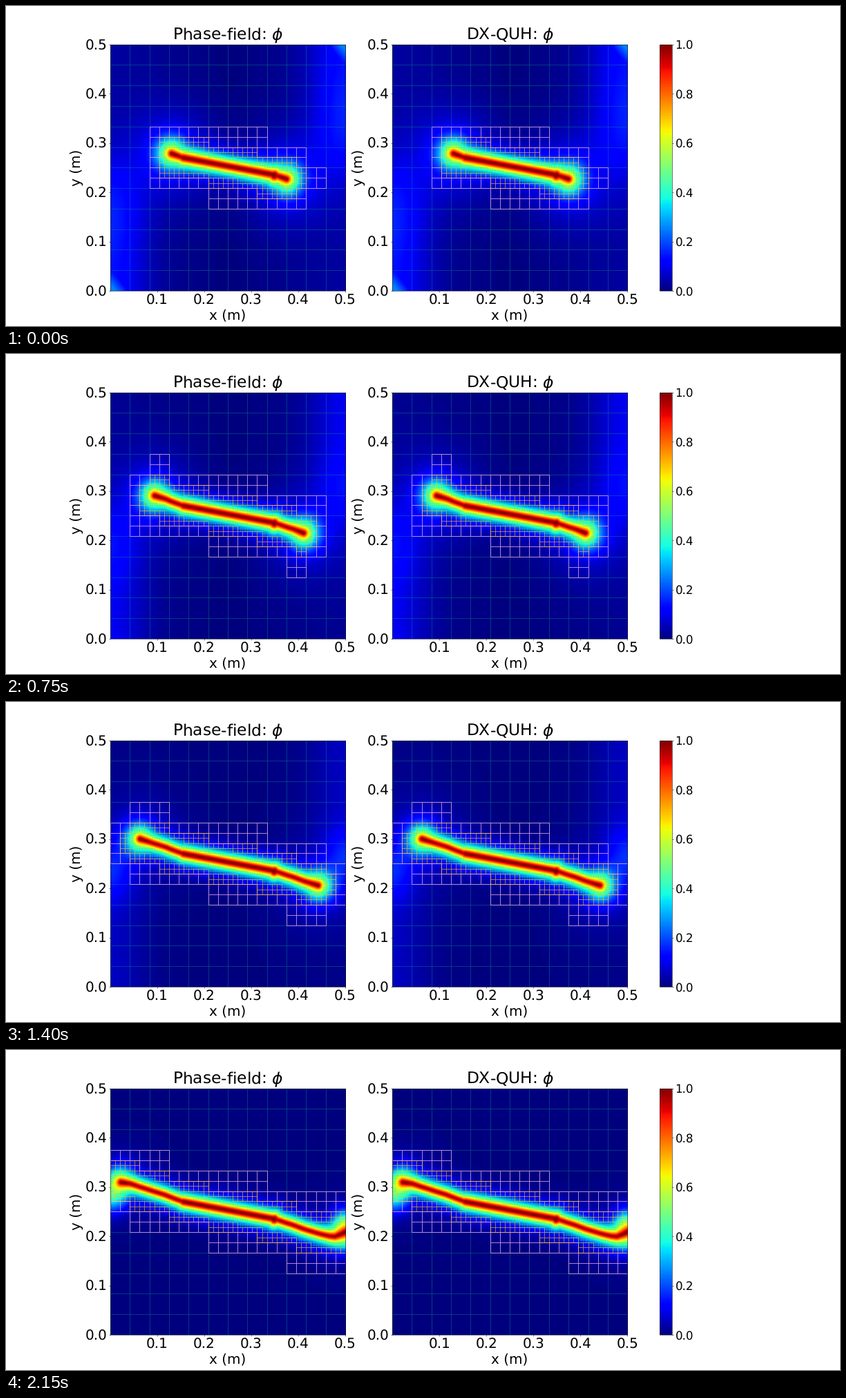
These frames come from a looping animation (1207x464 px, 2.2 s). A matplotlib script:

```python
import numpy as np
import matplotlib.pyplot as plt
from matplotlib.animation import FuncAnimation
from matplotlib.collections import LineCollection

DPI, FRAMES, STEP = 48, 44, 50
SIDE, N = 0.5, 192
COARSE = 12
REACH = 0.0187          # cells closer than this to the crack are refined most

# crack geometry: straight notch, then the path and timing of each tip
NOTCH = np.array([[0.155, 0.2695], [0.35, 0.2345]])
KNOT = [0.348, 0.2340]
LEFT_T = [0, 6, 15, 23, 28, 37, 43]
LEFT_X = [0.130, 0.118, 0.094, 0.0765, 0.063, 0.0435, 0.0225]
LEFT_Y = [0.278, 0.283, 0.290, 0.2955, 0.2995, 0.306, 0.309]
RIGHT_T = [0, 6, 15, 23, 28, 37, 41, 43]
RIGHT_X = [0.374, 0.388, 0.4103, 0.4295, 0.441, 0.4635, 0.478, 0.4995]
RIGHT_Y = [0.2265, 0.2225, 0.2143, 0.2088, 0.2055, 0.2002, 0.1990, 0.2085]

axis = (np.arange(N) + 0.5) * SIDE / N
X, Y = np.meshgrid(axis, axis)


def branch(start, end, xs, ys):
    """Points along one kinked branch from the notch to x = end."""
    px = np.r_[start[0], xs]
    py = np.r_[start[1], ys]
    order = np.argsort(px)
    x = np.linspace(start[0], end, 14)
    return np.column_stack([x, np.interp(x, px[order], py[order])])


def branches(k, pull=0.0):
    xl = np.interp(k, LEFT_T, LEFT_X) + pull
    xr = np.interp(k, RIGHT_T, RIGHT_X) - pull
    return (branch(NOTCH[0], xl, LEFT_X, LEFT_Y),
            branch(NOTCH[1], xr, RIGHT_X, RIGHT_Y))


def line_distance(pts):
    best = np.full(X.shape, 9.0)
    for (ax, ay), (bx, by) in zip(pts[:-1], pts[1:]):
        dx, dy = bx - ax, by - ay
        s = ((X - ax) * dx + (Y - ay) * dy) / (dx * dx + dy * dy)
        s = np.clip(s, 0, 1)
        best = np.minimum(best, np.hypot(X - ax - s * dx, Y - ay - s * dy))
    return best


def ramp(v, lo, hi):
    return np.clip((v - lo) / (hi - lo), 0, 1)


def profile(d, round_off, length=0.012):
    """Exponential decay with a rounded peak."""
    return np.exp(-(np.hypot(d, round_off) - round_off) / length)


def background(t):
    """Faint damage near the loaded edges, point symmetric about the centre."""
    total = 0.03 * (1 - t) * np.abs(X - SIDE / 2) / (SIDE / 2)
    edge = 0.1 * (1 - t ** 1.5)
    corner = 0.12 * (1 - ramp(t, 0, 0.36))
    spot = 0.03 + 0.29 * t ** 3
    y_spot = 0.285 - 0.14 * (1 - t)
    wide, tall = 0.032 + 0.03 * (1 - t), 0.036 + 0.06 * (1 - t)
    for x, y in ((X, Y), (SIDE - X, SIDE - Y)):
        fade = 1 / (1 + np.exp((y - 0.25) / 0.03))
        total = total + edge * np.exp(-(x / 0.075) ** 2) * fade
        total = total + corner * ramp(0.042 - x - y, 0, 0.03)
        total = total + spot * np.exp(-(x / wide) ** 2
                                      - ((y - y_spot) / tall) ** 2)
    return total


def field(k):
    t = k / (FRAMES - 1)
    left, right = branches(k)
    knot = np.maximum(np.hypot(X - KNOT[0], Y - KNOT[1]) - 0.002, 0)
    notch = np.minimum(line_distance(NOTCH), knot)
    new = np.minimum(line_distance(left), line_distance(right))
    phi = np.maximum(profile(notch, 0.006), 0.97 * profile(new, 0.004))
    glow = 0
    for tip in (left[-1], right[-1]):
        r = np.hypot(X - tip[0], Y - tip[1])
        halo = 0.5 * np.exp(-(r / 0.032) ** 1.8)
        phi = np.cbrt(phi ** 3 + halo ** 3)
        glow = glow + 0.11 * (1 - 0.7 * t) * np.exp(-(r / 0.08) ** 1.7)
    return np.clip(phi + (1 - phi) * (glow + background(t)), 0, 1)


def parents(cells):
    """Parents of the cells and of their face neighbours."""
    g = cells.copy()
    g[1:] |= cells[:-1]
    g[:-1] |= cells[1:]
    g[:, 1:] |= cells[:, :-1]
    g[:, :-1] |= cells[:, 1:]
    n = len(cells) // 2
    return g.reshape(n, 2, n, 2).any(axis=(1, 3))


def split(cells):
    return cells.repeat(2, axis=0).repeat(2, axis=1)


def near_crack(k):
    n = COARSE * 4
    h = SIDE / n
    left, right = branches(k, 0.0045)
    s = np.linspace(0, 1, 60)[:, None]
    pts = np.vstack([left, NOTCH[0] + s * (NOTCH[1] - NOTCH[0]), right])
    mid = (np.arange(n) + 0.5) * h
    gap = np.maximum(np.abs(mid[:, None, None] - pts) - h / 2, 0)
    d = np.hypot(gap[None, :, :, 0], gap[:, None, :, 1])
    return d.min(axis=2) < REACH


def edges(cells):
    """Every edge of the chosen cells, each once."""
    n = len(cells)
    h = SIDE / n
    flat = np.zeros((n + 1, n), bool)
    flat[:-1] |= cells
    flat[1:] |= cells
    up = np.zeros((n, n + 1), bool)
    up[:, :-1] |= cells
    up[:, 1:] |= cells
    j, i = np.nonzero(flat)
    a = np.stack([np.c_[i, j], np.c_[i + 1, j]], axis=1)
    j, i = np.nonzero(up)
    b = np.stack([np.c_[i, j], np.c_[i, j + 1]], axis=1)
    return np.concatenate([a, b]) * h


def mesh(k, phi):
    r2 = near_crack(k)
    r1 = parents(r2)
    r0 = parents(r1)
    n = COARSE * 8
    soft = phi.reshape(n, N // n, n, N // n).mean(axis=(1, 3)) < 0.52
    leaves = (~r0, split(r0) & ~r1, split(r1) & ~r2, split(r2) & soft)
    return [edges(c) for c in leaves]


# colour, width and opacity of the four mesh levels
STYLES = [("#0c9a80", 1.0, 0.55), ("#f0b4ec", 1.2, 0.9),
          ("#ffc820", 1.1, 0.8), ("#30f050", 0.8, 0.55)]

plt.rcParams["font.family"] = "DejaVu Sans"
plt.rcParams["text.hinting"] = "none"
fig, axes = plt.subplots(1, 2, figsize=(1207 / DPI, 464 / DPI), dpi=DPI)
images, nets = [], []
for ax, name in zip(axes, ("Phase-field", "DX-QUH")):
    images.append(ax.imshow(np.zeros((N, N)), cmap="jet", vmin=0, vmax=1,
                            origin="lower", extent=(0, SIDE, 0, SIDE),
                            aspect="auto", interpolation="bilinear"))
    net = [LineCollection([], colors=c, linewidths=w, alpha=a)
           for c, w, a in STYLES]
    for lines in net:
        ax.add_collection(lines, autolim=False)
    nets.append(net)
    ax.set(xlim=(0, SIDE), ylim=(0, SIDE))
    ax.set_xticks(np.arange(1, 6) / 10)
    ax.set_yticks(np.arange(6) / 10)
    ax.tick_params(labelsize=30)
    ax.set_xlabel("x (m)", fontsize=30)
    ax.set_ylabel("y (m)", fontsize=30)
    ax.set_title(name + r": $\phi$", fontsize=35)
bar = fig.colorbar(images[0], ax=list(axes))
bar.ax.tick_params(labelsize=25)


def draw(k):
    phi = field(k)
    levels = mesh(k, phi)
    for im, net in zip(images, nets):
        im.set_data(phi)
        for lines, segs in zip(net, levels):
            lines.set_segments(segs)
    return images + nets[0] + nets[1]


anim = FuncAnimation(fig, draw, frames=FRAMES, interval=STEP,
                     init_func=lambda: draw(0), repeat=True, repeat_delay=0)
plt.show()
```
